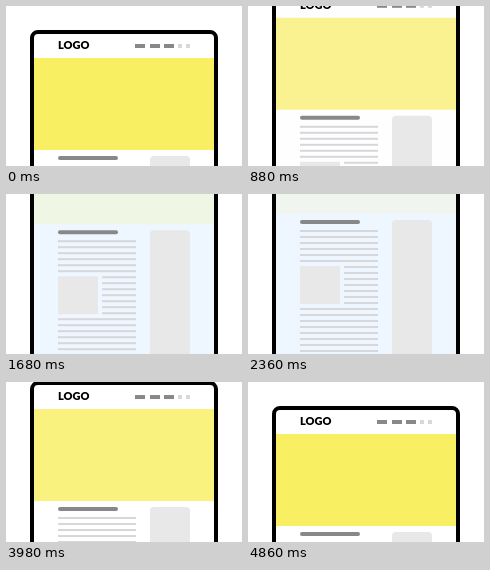
Recreate the animation shown at these times as an HTML page. Size 236x160 px, loop 4.88 s.

```html
<!DOCTYPE html>
<html lang="en">
<head>
<meta charset="utf-8">
<title>Scrolling page</title>
<style>
html, body { margin: 0; width: 100%; height: 100%; overflow: hidden; background: #fff; }
svg { display: block; width: 236px; height: 160px; }
text { font: 900 11px Lato, Inter, sans-serif; }
</style>
</head>
<body>
<svg viewBox="0 0 236 160">
  <g id="page">
    <rect id="paper" x="26" y="26" width="184" height="400" rx="6" fill="#fff"/>
    <text x="52" y="43">LOGO</text>
    <g fill="#888">
      <rect x="129" y="38" width="10" height="4"/>
      <rect x="144" y="38" width="10" height="4"/>
      <rect x="158" y="38" width="10" height="4"/>
      <rect x="52" y="150" width="60" height="4" rx="2"/>
    </g>
    <g fill="#d8d8d8">
      <rect x="172" y="38" width="4" height="4"/>
      <rect x="180" y="38" width="4" height="4"/>
    </g>
    <rect id="hero" x="28" y="52" width="180" height="92" fill="#f9ef63"/>
    <g fill="#e8e8e8">
      <rect x="144" y="150" width="40" height="260" rx="4"/>
      <rect x="52" y="196" width="40" height="38" rx="1"/>
    </g>
    <g id="lines" fill="#d7d7da"></g>
    <rect x="26" y="26" width="184" height="400" rx="6" fill="none" stroke="#000" stroke-width="4"/>
  </g>
</svg>
<script>
const $ = id => document.getElementById(id);
const LOOP = 4880, SCROLL = 124;
const clamp = v => Math.min(1, Math.max(0, v));

// Text lines; seven of them sit beside the picture
for (let i = 0; i < 24; i++) {
  const x = i > 5 && i < 13 ? 96 : 52;
  $('lines').innerHTML += `<rect x="${x}" y="${160 + 6 * i}" width="${130 - x}" height="2"/>`;
}

// cubic-bezier(.25, .1, .25, 1)
function ease(t) {
  const curve = (s, a, b) => 3 * (1 - s) ** 2 * s * a + 3 * (1 - s) * s * s * b + s ** 3;
  let lo = 0, hi = 1;
  for (let i = 0; i < 24; i++) {
    const mid = (lo + hi) / 2;
    if (curve(mid, .25, .25) < t) lo = mid; else hi = mid;
  }
  return curve(lo, .1, 1);
}

const phase = (t, from, to) => {
  const u = clamp((t - from) / (to - from));
  return u === 0 || u === 1 ? u : ease(u);
};

function draw(now) {
  const t = now % LOOP;
  const p = phase(t, 495, 2310) - phase(t, 3115, 4860);
  const tint = clamp((p - .3) / .38);
  $('page').setAttribute('transform', `translate(0 ${-SCROLL * p})`);
  $('hero').setAttribute('opacity', 1 - .9 * p);
  $('paper').setAttribute('fill', `rgb(${255 - 17 * tint}, ${255 - 9 * tint}, 255)`);
  requestAnimationFrame(() => draw(performance.now()));
}
draw(performance.now());
</script>
</body>
</html>
```
